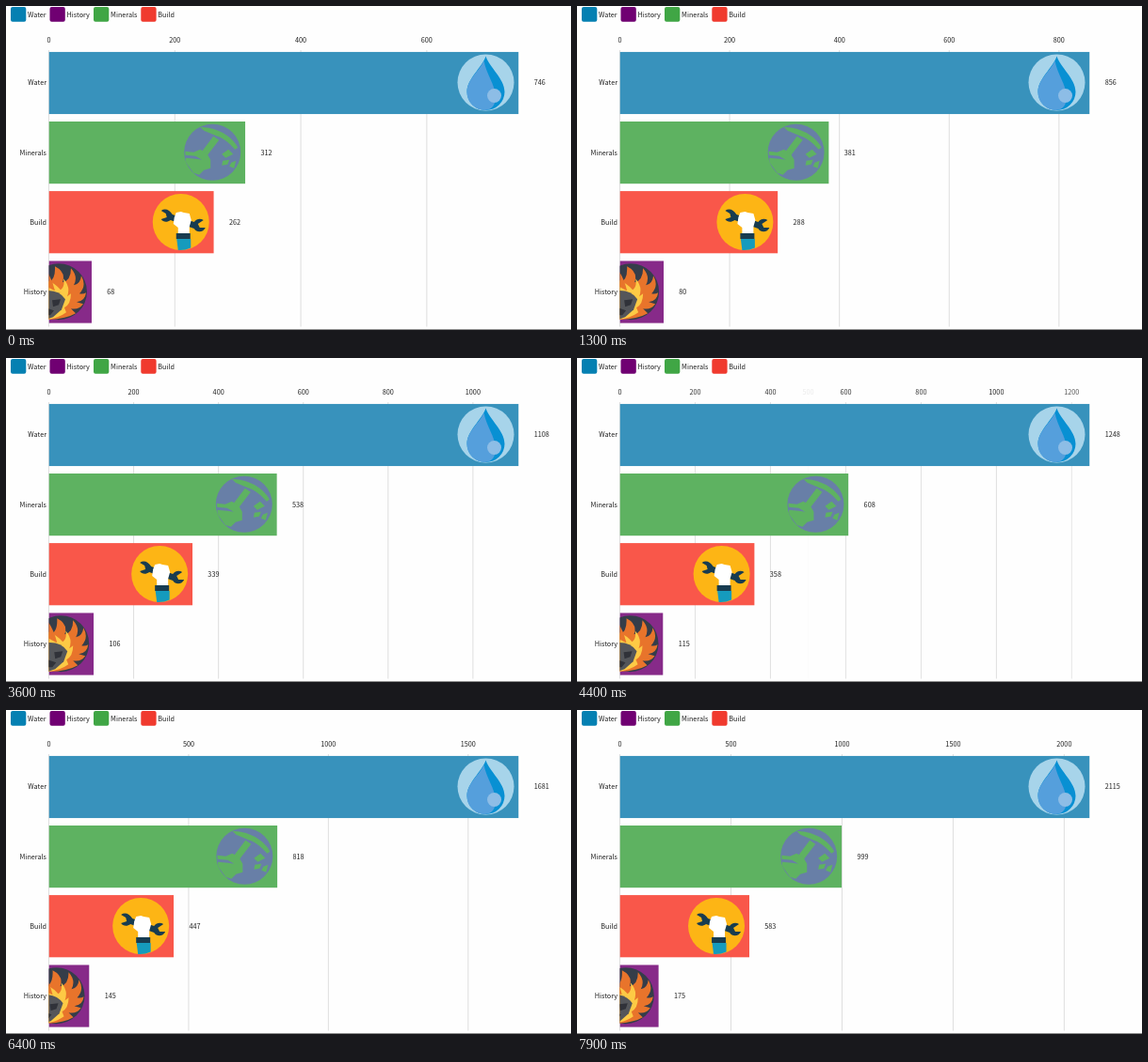
Write an HTML page with a canvas that moves like this. It is 600 px wide and 345 px high and loops after 8000 ms.

```html
<!DOCTYPE html>
<html lang="en">
<head>
<meta charset="utf-8">
<title>Bar chart race</title>
<style>
html, body { margin: 0; width: 600px; height: 345px; overflow: hidden; background: #fefefe; }
canvas { display: block; }
</style>
</head>
<body>
<canvas id="stage" width="600" height="345"></canvas>
<script>
const ctx = document.getElementById('stage').getContext('2d');
const LOOP = 8000, STEP = 100, LEFT = 45.5, WIDTH = 499, BAR = 66.5, FADE = 550;
const FONT = '7.25px "Noto Sans CJK JP", "Noto Sans CJK SC", "Noto Sans", sans-serif';

// Icons are layers of [colour, path] around the centre of a disc of radius 30.
const disc = 'M-30 0A30 30 0 1 1 30 0A30 30 0 1 1 -30 0Z';
const icons = {
  Water: [
    ['#a7d4ea', disc],
    ['#0890d3', 'M0-28C4-16 20-4 20 10A20 19.5 0 0 1-20 10C-20-4-4-16 0-28Z'],
    ['#559fdc', 'M-2-23C-7-12-20-3-20 10C-20 22-11 29-1 29.5C7 29 11 23 10 14C10 2 1-8-2-23Z'],
    ['#8dbde6', 'M1.5 14A7.5 7.5 0 1 1 16.5 14A7.5 7.5 0 1 1 1.5 14Z']
  ],
  Minerals: [
    ['#687fa7', disc],
    ['#5eb261', 'M-13-27L-4-26C11-23 22-15 27-5L24-3C17-11 10-16 3-18L-9-23Z'],
    ['#5eb261', 'M1-17L7-13L-6 4L-11-1Z'],
    ['#5eb261', 'M-29-1L-20 0L-13-3L-6 1L-2 8L-2 17L-9 19L-14 24L-20 22L-28 11Z'],
    ['#5eb261', 'M10 2L17-3L22 2L14 6ZM11 9L18 8L16 13L10 14ZM20 11L25 9L23 17L18 15Z'],
    ['#687fa7', 'M-29 3L-18 4L-11 8L-18 7L-29 6Z']
  ],
  Build: [
    ['#fdb515', disc],
    ['#183c50', 'M-21-12C-17-15-12-13-9-8L14 0C17-4 21-4 24-2L18 2L20 6L26 6C24 11 17 12 14 7L-11-2C-15 1-19 0-21-3L-15-5L-16-9Z'],
    ['#ffffff', 'M-7-5L-5-10L0-11L3-10L9-9L11-2L9 5L9 13L-3 13L-3 6L-8 2Z'],
    ['#183c50', 'M-5 12H10V18H-5Z'],
    ['#159bbd', 'M-4.500 18H10.500V27.500Q4 30.500-3 30Z']
  ],
  History: [
    ['#353d49', disc],
    ['#e8742b', 'M-14-9Q-3-10-4-27Q8-21 4-10Q13-12 13-25Q21-16 16-7Q23-8 24-17Q30-6 22 2Q26 3 29 1Q28 10 19 11L26 13Q21 20 13 18L18 23Q8 29-14 30Z'],
    ['#fdca45', 'M-14-13Q-4-9 2-2Q7-6 5-14Q13-5 9 5L13 2Q13 13 6 17L8 22Q0 28-14 30Z'],
    ['#e8742b', 'M-14-24Q-7-14-4-1L-14-6Z'],
    ['#54565a', 'M-14-1Q0-2 7 8L3 19L-6 27L-14 30Z'],
    ['#303239', 'M-7 9L2 8L0 14L-6 16ZM-14 17L-5 20L-9 25L-14 25Z']
  ]
};
for (const layers of Object.values(icons))
  for (const layer of layers) layer[1] = new Path2D(layer[1]);

const times = [0, 1300, 2600, 3600, 5200, 6400, 7900];
const bars = [
  { name: 'Water', color: '#3892bc', data: [746, 856, 977, 1108, 1404, 1681, 2115] },
  { name: 'Minerals', color: '#5eb261', data: [312, 381, 462, 538, 683, 818, 999] },
  { name: 'Build', color: '#f9574a', data: [262, 288, 315, 339, 382, 447, 583] },
  { name: 'History', color: '#872a89', data: [68, 80, 94, 106, 125, 145, 175] }
];
const legend = [
  ['Water', '#0580b2', 5], ['History', '#700072', 46.5],
  ['Minerals', '#40a645', 93], ['Build', '#f03a2e', 143.3]
];

// Axis ticks: value, time of entry, time of exit
const SWITCH = 4350;
const ticks = [
  [0], [200, -LOOP, SWITCH], [400, -LOOP, SWITCH], [600, -LOOP, SWITCH],
  [800, 450, SWITCH], [1000, 2400], [1200, 3950, SWITCH],
  [500, SWITCH], [1500, 5350], [2000, 7050]
];

const clamp = v => Math.max(0, Math.min(1, v));

// Smooth curve through the data points
function valueAt(data, t) {
  const last = times.length - 1;
  let i = 0;
  while (i < last - 1 && t >= times[i + 1]) i++;
  const slope = k => {
    const a = Math.max(0, k - 1), b = Math.min(last, k + 1);
    return (data[b] - data[a]) / (times[b] - times[a]);
  };
  const span = times[i + 1] - times[i], u = clamp((t - times[i]) / span), w = 1 - u;
  return data[i] * w * w * (1 + 2 * u) + data[i + 1] * u * u * (3 - 2 * u)
    + span * u * w * (w * slope(i) - u * slope(i + 1));
}

function text(str, x, y, align = 'left') {
  ctx.fillStyle = '#202020';
  ctx.textAlign = align;
  ctx.fillText(str, x, y);
}

function drawLegend() {
  for (const [name, color, x] of legend) {
    ctx.fillStyle = color;
    ctx.beginPath();
    ctx.roundRect(x, 1, 16.3, 15.7, 2);
    ctx.fill();
    text(name, x + 18, 12);
  }
}

function drawAxis(t, scale) {
  for (const [value, enter = -LOOP, exit = LOOP * 2] of ticks) {
    const x = LEFT + value * scale;
    ctx.globalAlpha = clamp((t - enter) / FADE) * (1 - clamp((t - exit) / FADE));
    ctx.fillStyle = '#dedede';
    ctx.fillRect(x - 0.5, 47, 1, 294.5);
    if (ctx.globalAlpha) text(value, x, 39.2, 'center');
  }
  ctx.globalAlpha = 1;
}

function drawBar({ name, color, data }, row, t, scale) {
  const value = valueAt(data, t), length = value * scale;
  const top = 48.7 + row * 74.2, middle = top + BAR / 2;
  ctx.save();
  ctx.beginPath();
  ctx.rect(LEFT, top, length, BAR);
  ctx.clip();
  ctx.fillStyle = color;
  ctx.fillRect(LEFT, top, length, BAR);
  ctx.translate(LEFT + length - 35, middle - 0.4);
  for (const [fill, path] of icons[name]) {
    ctx.fillStyle = fill;
    ctx.fill(path);
  }
  ctx.restore();
  text(name, 43, middle + 2.4, 'right');
  text(Math.round(value), LEFT + length + 16.2, middle + 2.4);
}

function draw(now) {
  const t = Math.floor(now % LOOP / STEP) * STEP;
  const scale = WIDTH / valueAt(bars[0].data, t);
  ctx.fillStyle = '#fefefe';
  ctx.fillRect(0, 0, 600, 345);
  ctx.font = FONT;
  drawLegend();
  drawAxis(t, scale);
  bars.forEach((bar, row) => drawBar(bar, row, t, scale));
  ctx.fillStyle = '#8c8c8c';
  ctx.fillRect(0, 344, 600, 1);
}

const start = performance.now();
function frame() {
  draw(performance.now() - start);
  requestAnimationFrame(frame);
}
frame();
</script>
</body>
</html>
```
